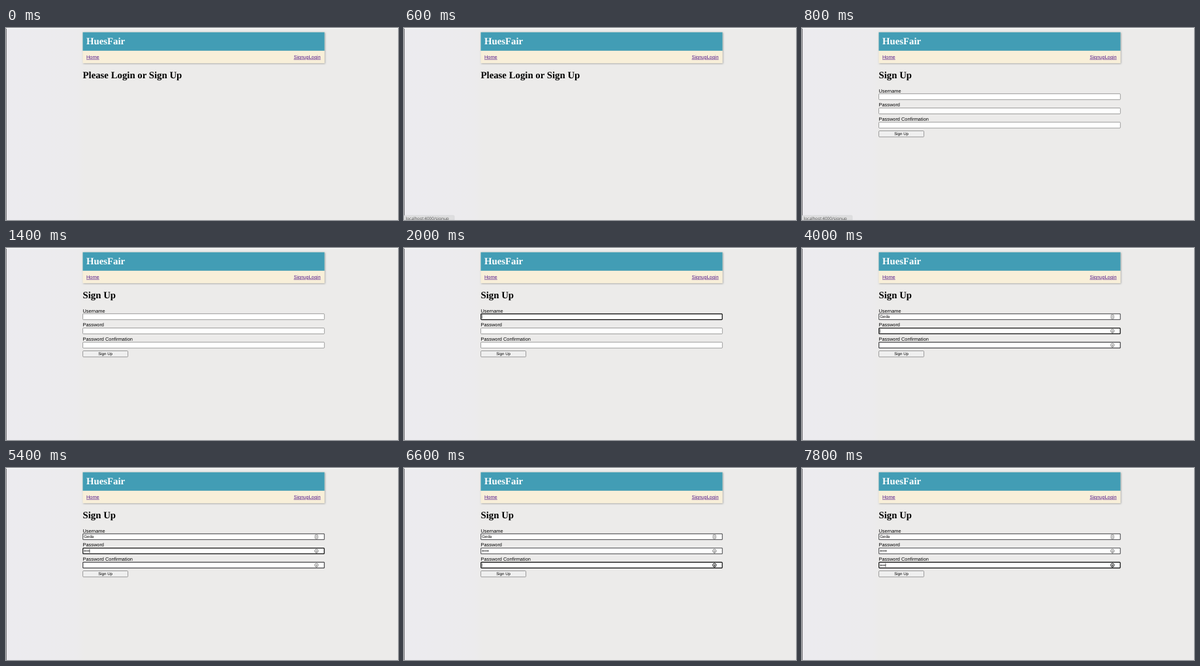
Animation, 600 px wide and 294 px high, one loop 8000 ms. Source, as an HTML page:

```html
<!DOCTYPE html>
<html lang="en">
<head>
<meta charset="utf-8">
<title>Sign up form</title>
<style>
  html, body { margin: 0; width: 100%; height: 100%; overflow: hidden; background: #ecebea; }
  svg { display: block; width: 600px; height: 294px; }
  text {
    font: 7.4px "Liberation Sans", Arial, sans-serif;
    fill: #000; white-space: pre; text-rendering: geometricPrecision;
  }
  .title { font: bold 14.8px "Liberation Serif", "Times New Roman", serif; }
  .brand { fill: #fff; }
  .link { fill: #551a8b; text-decoration: underline; }
  .small { font-size: 6.17px; }
  .box { fill: #fff; stroke: #767676; stroke-width: .7; }
  .edge { fill: none; stroke: #2c2c30; stroke-width: .9; }
  .ring { fill: none; stroke: #101010; stroke-width: 1.15; }
  .caret { stroke: #000; stroke-width: .6; }
  .icon { fill: none; stroke: #555; stroke-width: .7; }
  .icon.strong { stroke: #111; stroke-width: 1; }
  .status text { font: 6.4px "Noto Sans", "Open Sans", sans-serif; fill: #555; }

  .status { animation: status 8s infinite; }
  @keyframes status {
    0%, 7.49% { opacity: 0; }
    7.5%, 12.5% { opacity: 1; }
    17.5%, 100% { opacity: 0; }
  }
</style>
</head>
<body>
<svg viewBox="0 0 600 294">
  <defs>
    <linearGradient id="page">
      <stop offset="0" stop-color="#ecebef"/>
      <stop offset=".18" stop-color="#ecebed"/>
      <stop offset=".2" stop-color="#ecebea"/>
    </linearGradient>
    <filter id="shadow" x="-5%" y="-10%" width="110%" height="130%">
      <feDropShadow dx=".8" dy=".8" stdDeviation=".8" flood-color="#555" flood-opacity=".5"/>
    </filter>
  </defs>

  <rect width="600" height="294" fill="url(#page)"/>
  <rect width="600" height="1.5" fill="#fafafa"/>
  <rect y="1" width="1" height="293" fill="#77767a"/>

  <g filter="url(#shadow)" style="color-interpolation-filters: sRGB">
    <rect x="117.5" y="6.5" width="370" height="47.4" fill="#f8efd9"/>
    <rect x="117.5" y="6.5" width="370" height="28.3" fill="#439db5"/>
  </g>
  <text class="title brand" x="123" y="25.4">HuesFair</text>
  <text class="link" x="123" y="46.7">Home</text>
  <text class="link" x="481.6" y="46.7" text-anchor="end">SignupLogin</text>

  <text id="welcome" class="title" x="117.5" y="77.3">Please Login or Sign Up</text>

  <g id="form">
    <text class="title" x="117.5" y="77.3">Sign Up</text>
    <g id="fields"></g>
    <rect x="117.6" y="157.5" width="69" height="9.3" rx="1.2" fill="#efefef" stroke="#767676" stroke-width=".7"/>
    <text class="small" x="152.1" y="164.3" text-anchor="middle">Sign Up</text>
  </g>

  <g class="status">
    <path d="M0 287H75.5Q77 287 77 288.5V294H0Z" fill="#dededf" stroke="#cfcfd0" stroke-width=".5"/>
    <text x="2.6" y="294.4">localhost:4000/signup</text>
  </g>
</svg>

<script>
const LOOP = 8000, PAGE_AT = 800, ICONS_AT = 2400;
const userIcon = '<rect x="473.1" y="-2.8" width="4.1" height="5.8" rx=".8"/><path d="M475.15 -1.4V1.6"/>';
const keyIcon = '<circle cx="475.2" r="2.7"/><path d="M475.2 -1.3V.9M474.1 .2L475.2 1.3L476.3 .2M474.3 3H476.1"/>';

// keys: times at which the text grows, with its length from then on
const specs = [
  { label: 'Username', y: 105.2, value: 'Geda', icon: userIcon, focus: [1800, 4000],
    keys: [[2600, 1], [3200, 3], [3400, 4]] },
  { label: 'Password', y: 127, value: '•••••', icon: keyIcon, focus: [4000, 6600],
    keys: [[4600, 1], [4800, 2], [5000, 3], [5400, 4], [6200, 5]], blink: [6000, 6200] },
  { label: 'Password Confirmation', y: 148.7, value: '••••', icon: keyIcon, focus: [6600, LOOP],
    keys: [[7200, 1], [7400, 2], [7600, 3], [7800, 4]], strong: true }
];

const byId = id => document.getElementById(id);
const within = (t, span) => !!span && t >= span[0] && t < span[1];
const show = (el, on) => el.setAttribute('visibility', on ? 'inherit' : 'hidden');

byId('fields').innerHTML = specs.map(s => `
  <g transform="translate(0 ${s.y})">
    <text x="117.5" y="-6.6">${s.label}</text>
    <rect class="box" x="117.6" y="-4.5" width="369.7" height="9" rx=".9"/>
    <path class="edge" d="M117.8 4.4V-4.4H487.2V4.4Z"/>
    <rect class="ring" x="117.8" y="-4.4" width="369.3" height="8.8" rx="1"/>
    <g class="icon">${s.icon}</g>
    <text class="small value" x="119.2" y="2.2"></text>
    <path class="caret" d="M0 -3V3"/>
  </g>`).join('');

const fields = specs.map((spec, i) => {
  const root = byId('fields').children[i];
  const part = name => root.querySelector('.' + name);
  return { spec, edge: part('edge'), ring: part('ring'), icon: part('icon'),
           value: part('value'), caret: part('caret') };
});

function drawField({ spec, edge, ring, icon, value, caret }, t) {
  const focused = within(t, spec.focus);
  const count = spec.keys.reduce((n, [at, len]) => t >= at ? len : n, 0);
  const text = spec.value.slice(0, count);
  if (value.textContent !== text) value.textContent = text;
  const end = 119.4 + (count ? value.getComputedTextLength() : 0);
  caret.setAttribute('transform', `translate(${end} 0)`);
  show(caret, focused && !within(t, spec.blink));
  show(ring, focused);
  show(icon, t >= ICONS_AT);
  show(edge, t >= ICONS_AT && !focused);
  // a field that has lost focus keeps a softer border
  edge.style.opacity = t >= spec.focus[1] ? .75 : 1;
  icon.classList.toggle('strong', !!spec.strong && focused);
}

function draw() {
  const t = performance.now() % LOOP;
  show(byId('welcome'), t < PAGE_AT);
  show(byId('form'), t >= PAGE_AT);
  for (const field of fields) drawField(field, t);
  // keep the CSS fade on the same clock
  for (const anim of document.getAnimations()) anim.currentTime = t;
  requestAnimationFrame(draw);
}
draw();
</script>
</body>
</html>
```
